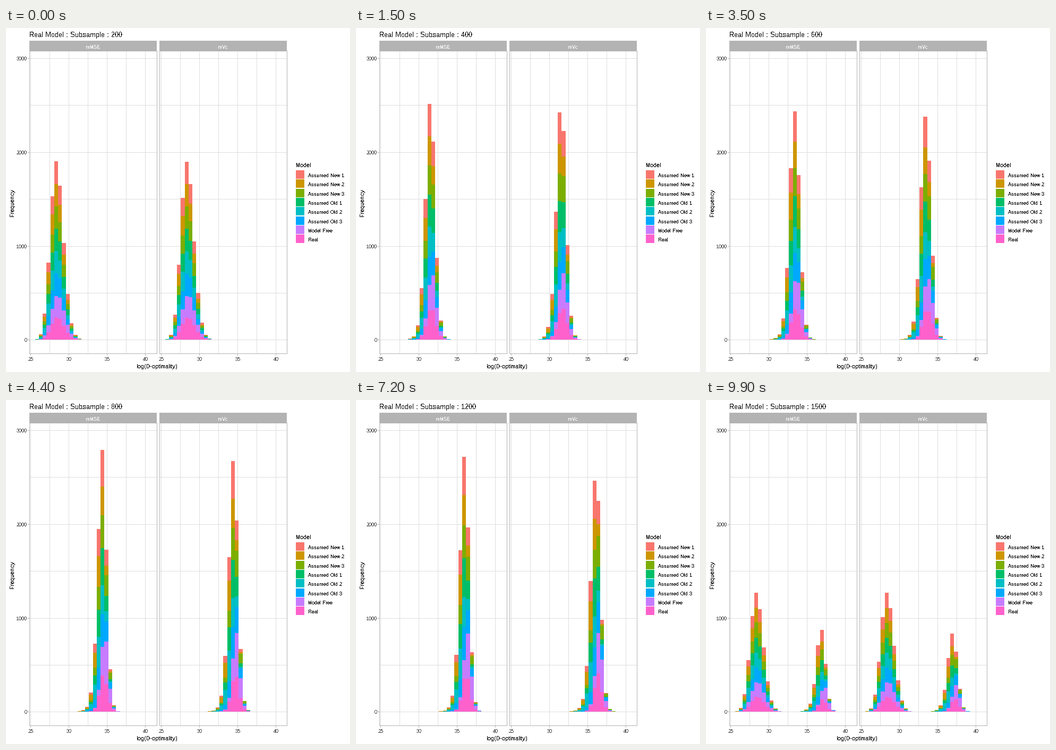
Write a matplotlib script that moves like this. It is 648 px wide and 648 px high and loops after 10000 ms.

```python
import math

import matplotlib.pyplot as plt
import numpy as np
from matplotlib.animation import FuncAnimation
from matplotlib.collections import PolyCollection
from matplotlib.patches import Rectangle

SIZE = 648
FRAMES, STEP_MS = 100, 100
BINS = 30
BIN_W = 7.273                    # pixels per histogram bin
BIN_X = (54.55, 300.15)          # left edge of bin 0 in each panel
BASE_Y, PX_PER_COUNT = 587, 518 / 2935
PANELS = ((44, "mMSE"), (289, "mVc"))
GREY, GRID, AXIS_TEXT = "#B3B3B3", "#DEDEDE", "#4D4D4D"

MODELS = (
    ("Assumed New 1", "#F8766D", "first"),
    ("Assumed New 2", "#CD9600", "second"),
    ("Assumed New 3", "#7CAE00", "third"),
    ("Assumed Old 1", "#00BE67", "first"),
    ("Assumed Old 2", "#00BFC4", "second"),
    ("Assumed Old 3", "#00A9FF", "third"),
    ("Model Free", "#C77CFF", "free"),
    ("Real", "#FF61CC", "real"),
)

# In bins: shift at the smallest sample, its slope, extra slope in the second
# panel, then the spread and skew that large samples settle to
SHAPES = {
    "first": (-.03, -.09, -.03, 1.0, -.14),
    "second": (-.31, -.20, -.13, 1.16, -.18),
    "third": (0, .08, .10, 1.17, -.03),
    "free": (.37, .42, 0, .83, -.03),
    "real": (.25, .17, .08, 1.0, .01),
}
START_SPREAD, START_SKEW = 1.64, .07

SIZES = range(200, 1600, 100)
ARRIVE = [0, 7, 15, *range(23, 101, 7)]   # frame where each size is reached

erf = np.vectorize(math.erf)


def bell_cdf(z, skew, heavy):
    """Skewed blend of a normal and a logistic curve."""
    inner = np.maximum(skew * z + math.exp(skew * skew / 2), 1e-9)
    u = np.log(inner) / skew
    normal = (1 + erf(u / math.sqrt(2))) / 2
    logistic = (1 + np.tanh(u * math.pi / math.sqrt(12))) / 2
    return (1 - heavy) * normal + heavy * logistic


def counts(size, panel):
    """Counts as an array of models by bins."""
    x = math.log(size / 200)
    early = math.exp(-2.1 * x ** 1.5)
    mean = 5.75 + 8.74 * x - .298 * x * x + panel * (.03 + .13 * x)
    edges = np.arange(BINS + 1)
    rows = []
    for _, _, kind in MODELS:
        shift, slope, extra, spread, skew = SHAPES[kind]
        centre = mean + shift + (slope + panel * extra) * x
        spread += (START_SPREAD - spread) * early
        skew += (START_SKEW - skew) * early
        cdf = bell_cdf((edges - centre) / spread, skew, .7 * (1 - early))
        rows.append(1000 * np.diff(cdf))
    return np.array(rows)


DATA = [[counts(size, panel) for panel in range(2)] for size in SIZES]

plt.rcParams.update({
    "font.family": "Liberation Sans",
    "text.hinting": "native",
    "text.hinting_factor": 1,
    "text.antialiased": False,
})
fig = plt.figure(figsize=(SIZE / 72, SIZE / 72), dpi=72, facecolor="white")
ax = fig.add_axes([0, 0, 1, 1])
ax.set_xlim(0, SIZE)
ax.set_ylim(SIZE, 0)
ax.axis("off")


def box(x, y, w, h, color, z=1):
    ax.add_patch(Rectangle((x, y), w, h, fc=color, lw=0, antialiased=False, zorder=z))


def label(x, y, text, size, color="black", ha="left", va="baseline", **kw):
    return ax.text(x, y, text, fontsize=size, color=color, ha=ha, va=va, zorder=5, **kw)


def grid_y(i):
    return int(587.7 - 88.35 * i)


def draw_panel(left, name):
    box(left, 24, 240, 20, GREY)
    label(left + 119.5, 39, name, 9, "white", "center")
    for i in range(7):
        x = left + 2 + 36 * i + (left > 200)
        box(x, 44, 1, 569, GRID)
        box(left, grid_y(i), 241, 1, GRID)
        if i % 2 == 0:
            box(x, 614, 1, 3, GREY)
            label(x + .5, 627, str(25 + 5 * i // 2), 9, AXIS_TEXT, "center")
    for y in (43, 613):
        box(left, y, 241, 1, GREY, 4)
    for x in (left, left + 240):
        box(x, 43, 1, 571, GREY, 4)


for left, name in PANELS:
    draw_panel(left, name)
for i in range(4):
    y = grid_y(2 * i)
    box(41, y, 3, 1, GREY)
    label(39.5, y + 4, str(1000 * i), 9, AXIS_TEXT, "right")

title = label(44, 17, "", 13)
label(284.5, 641, "log(D-optimality)", 11, ha="center")
label(12, 329, "Frequency", 11, ha="center", va="center", rotation=90)
label(546, 262, "Model", 11)
for i, (name, color, _) in enumerate(MODELS):
    top = round(268.2 + 17.28 * i)
    box(546, top, 16, 16, color)
    label(569, top + 13, name, 9)

bars = [PolyCollection([], facecolors=color, linewidths=0, antialiaseds=False, zorder=3)
        for _, color, _ in MODELS]
for bar in bars:
    ax.add_collection(bar, autolim=False)


def stack(tables):
    """Pixel rectangles for each model, stacked from the last one up."""
    rects = [[] for _ in MODELS]
    for x0, table in zip(BIN_X, tables):
        edges = np.rint(x0 + BIN_W * np.arange(BINS + 1))
        upper = np.cumsum(table[::-1], axis=0)[::-1]
        tops = np.rint(BASE_Y - PX_PER_COUNT * upper)
        lows = np.vstack([tops[1:], np.full(BINS, BASE_Y)])
        for m, k in zip(*np.nonzero(lows > tops)):
            l, r, t, b = edges[k], edges[k + 1], tops[m, k], lows[m, k]
            rects[m].append([(l, t), (r, t), (r, b), (l, b)])
    return rects


def update(frame):
    i = max(j for j in range(len(SIZES)) if ARRIVE[j] <= frame)
    nxt = (i + 1) % len(SIZES)
    steps = 4 if i < 3 else 3
    step = max(0, frame - ARRIVE[i + 1] + steps)
    p = step / steps
    tables = [(1 - p) * a + p * b for a, b in zip(DATA[i], DATA[nxt])]
    for bar, rects in zip(bars, stack(tables)):
        bar.set_verts(rects)
    near = i if 2 * step <= steps + 1 else nxt
    title.set_text(f"Real Model : Subsample : {SIZES[near]}")
    return bars + [title]


anim = FuncAnimation(fig, update, frames=FRAMES, interval=STEP_MS,
                     repeat=True, repeat_delay=0, blit=False)
plt.show()
```
